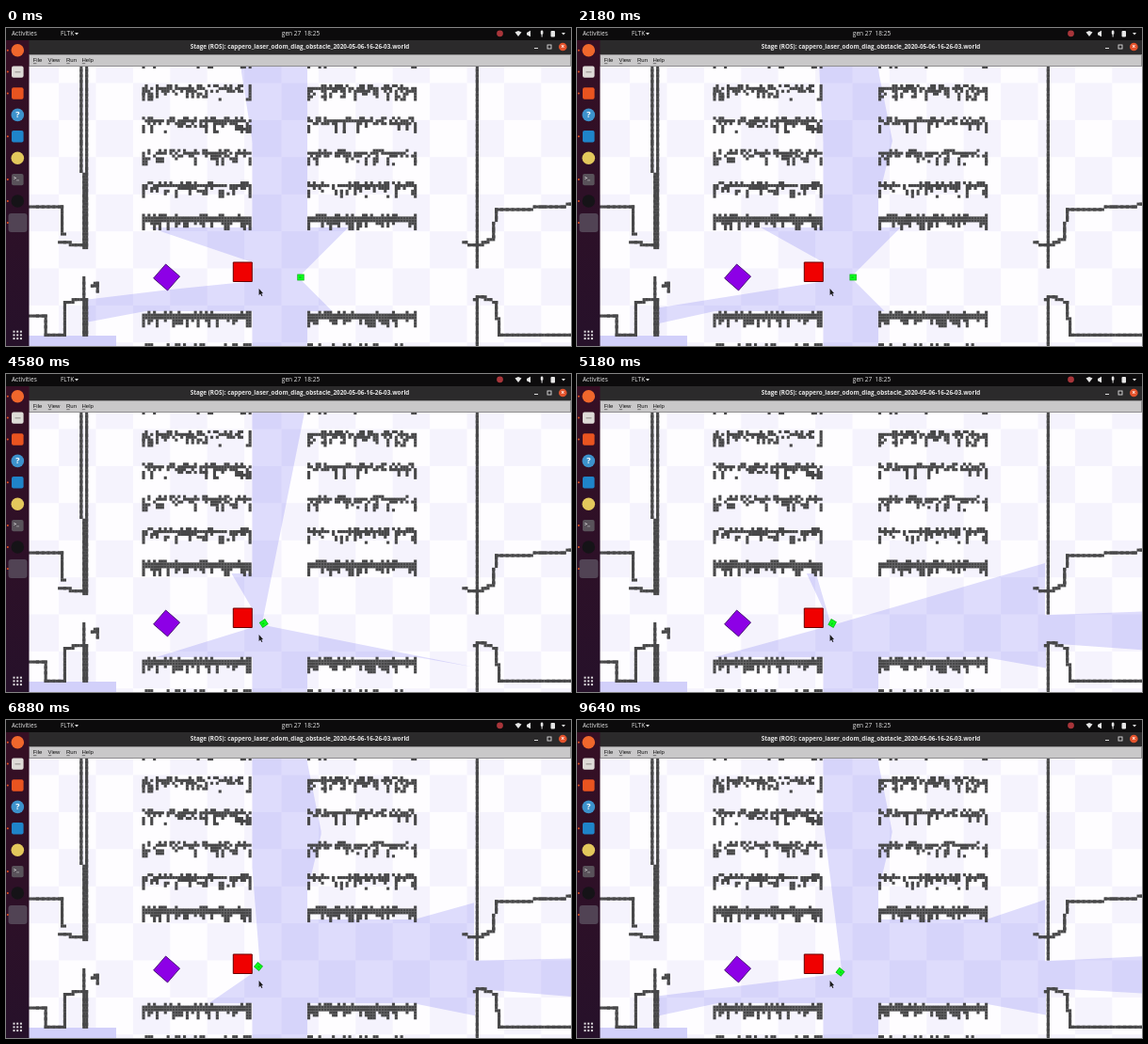
Animation, 600 px wide and 338 px high, one loop 9.73 s. Source, as an HTML page with a canvas:

```html
<!DOCTYPE html>
<html lang="en">
<head>
<meta charset="utf-8">
<title>Robot simulation</title>
<style>
  html, body { margin: 0; width: 100%; height: 100%; overflow: hidden; background: #fff; }
  canvas { display: block; width: 600px; height: 338px; }
</style>
</head>
<body>
<canvas id="stage" width="600" height="338"></canvas>
<script>
const LOOP = 9730, W = 600, H = 338, CELL = 2.9, DARK = '#484849', FAR = 300;
const LEFT_SHELF = 144.5, RIGHT_SHELF = 320, SHELF_W = 117;
const ctx = document.getElementById('stage').getContext('2d');

let seed = 41;
function random() {
  seed = (seed * 16807) % 2147483647;
  return seed / 2147483647;
}
const chance = p => random() < p;

function makeLayer(draw) {
  const layer = document.createElement('canvas');
  layer.width = W;
  layer.height = H;
  draw(layer.getContext('2d'));
  return layer;
}

function rect(g, color, x, y, w, h) {
  g.fillStyle = color;
  g.fillRect(x, y, w, h);
}

function rounded(g, color, x, y, w, h, r) {
  g.fillStyle = color;
  g.beginPath();
  g.roundRect(x, y, w, h, r);
  g.fill();
}

const disc = (g, color, x, y, r) => rounded(g, color, x - r, y - r, 2 * r, 2 * r, r);

function poly(g, points, fill, stroke) {
  g.beginPath();
  points.forEach(([x, y]) => g.lineTo(x, y));
  g.closePath();
  if (fill) { g.fillStyle = fill; g.fill(); }
  if (stroke) { g.strokeStyle = stroke; g.lineWidth = 1; g.stroke(); }
}

function text(g, value, x, y, font, color, align = 'left') {
  g.font = font;
  g.fillStyle = color;
  g.textAlign = align;
  g.textBaseline = 'middle';
  g.fillText(value, x, y);
}

const box = (x, y, w, h) => [[x, y], [x + w, y], [x + w, y + h], [x, y + h]];

function turnedSquare(x, y, radius, turn) {
  return [0, 1, 2, 3].map(i => {
    const a = turn + i * Math.PI / 2;
    return [x + radius * Math.cos(a), y + radius * Math.sin(a)];
  });
}

const RED = box(241.3, 249, 20, 20.5);
const PURPLE = turnedSquare(170.6, 265, 14, -0.07);

// Ragged shelf of map cells: an uneven band with drips below it.
function shelf(g, x, y, solid) {
  const columns = Math.round(SHELF_W / CELL);
  for (let i = 0; i < columns; i++) {
    const put = row => rect(g, DARK, x + i * CELL, y + row * CELL, CELL + 0.2, CELL + 0.2);
    const edge = i === 0 || i === columns - 1;
    if (chance(0.35)) put(0);
    if (solid || chance(0.85)) put(1);
    if (solid || chance(0.5)) put(2);
    const drop = edge ? 3 : chance(solid ? 0.45 : 0.3) ? 1 + Math.floor(random() * 3) : 0;
    for (let k = 0; k < drop; k++) put(3 + k);
    if (!solid && chance(0.12)) put(3 + Math.floor(random() * 3));
  }
}

// Walls are polylines snapped to the cells of the map.
function wall(g, ...points) {
  const snap = v => Math.round(v / CELL) * CELL;
  for (let i = 1; i < points.length; i++) {
    const [ax, ay] = points[i - 1], [bx, by] = points[i];
    const steps = Math.ceil(Math.hypot(bx - ax, by - ay) / 2);
    for (let k = 0; k <= steps; k++) {
      const t = k / steps;
      rect(g, DARK, snap(ax + (bx - ax) * t - 1.5), snap(ay + (by - ay) * t - 1.5),
        CELL + 0.2, CELL + 0.2);
    }
  }
}

const floor = makeLayer(g => {
  rect(g, '#fefdff', 0, 0, W, H);
  const size = 39.4;
  for (let row = -1; row < 8; row++)
    for (let col = -7; col < 8; col++)
      if ((row + col) % 2 === 0)
        rect(g, '#f5f3fd', 292.5 + col * size, 58.5 + row * size, size, size);
});

const map = makeLayer(g => {
  rect(g, '#d2d0fa', 24, 327, 93, 11);
  for (let i = 0; i < 10; i++) {
    if (i === 6 || i === 7) continue;
    for (const x of [LEFT_SHELF, RIGHT_SHELF]) shelf(g, x, 25.5 + i * 34.4, i > 4);
  }

  wall(g, [85, 42], [85, 234]);
  wall(g, [80.5, 42], [80.5, 120], [83, 234]);
  wall(g, [26, 189], [60, 189], [61, 220]);
  wall(g, [58, 227], [83, 232]);
  wall(g, [82, 266], [82, 326]);
  wall(g, [85, 288], [85, 326]);
  wall(g, [91, 275], [96, 271], [96, 281]);
  wall(g, [26, 307], [42, 307], [42, 325], [61, 325], [63, 292], [79, 288]);

  wall(g, [499, 42], [499, 255]);
  wall(g, [486, 228], [500, 232], [518, 223], [520, 193], [570, 191], [600, 188]);
  wall(g, [499, 286], [499, 338]);
  wall(g, [496, 289], [505, 285], [521, 292], [523, 325], [600, 326]);

  poly(g, PURPLE, '#8d00e6', '#4a1478');
  poly(g, RED, '#f00000', '#6a0000');
});

function drawDock(g) {
  const shade = g.createLinearGradient(0, 13, 0, H);
  shade.addColorStop(0, '#360f24');
  shade.addColorStop(1, '#26112a');
  rect(g, shade, 0, 13, 24.5, 325);

  const icons = [['disc', '#f0672c'], ['tile', '#dedbd7'], ['tile', '#e95420'],
    ['disc', '#3d92cc'], ['tile', '#1f84c9'], ['disc', '#e3c85c'],
    ['tile', '#59525a'], ['disc', '#151317'], ['slot', '#514354']];
  icons.forEach(([kind, color], i) => {
    const y = 23.7 + i * 22.9;
    if (kind === 'disc') disc(g, color, 12.3, y, 6.8);
    else if (kind === 'tile') rounded(g, color, 6, y - 6.2, 12.6, 12.4, 2);
    else rounded(g, color, 2.5, y - 10, 20, 20, 3);
    if (i !== 3 && i !== 5) disc(g, '#e95420', 1.8, y, 1);
  });
  rect(g, '#a9a5a2', 9.5, 46, 6, 1.5);
  text(g, '?', 12.3, 92.8, 'bold 9px "Open Sans", sans-serif', '#fff', 'center');
  text(g, '>_', 8, 160, 'bold 5px "DejaVu Sans Mono", monospace', '#eee');

  for (let i = 0; i < 9; i++)
    rect(g, '#e2dfe2', 7.5 + (i % 3) * 3.7, 321.7 + Math.floor(i / 3) * 3.7, 2, 2);
}

function drawTopBar(g) {
  const ink = '#e6e6e6', font = '6.5px "Open Sans", sans-serif';
  const caret = x => poly(g, [[x - 2, 5], [x + 2, 5], [x, 7.5]], ink);
  rect(g, '#0c0b0c', 0, 0, W, 13);
  text(g, 'Activities', 6, 6.3, font, ink);
  text(g, 'FLTK', 58, 6.3, font, ink);
  text(g, 'gen 27  18:25', 313, 6.3, font, ink, 'center');
  caret(75);
  caret(592);

  disc(g, '#a8353a', 524.5, 5.8, 3.4);
  poly(g, [[540.5, 4.5], [544, 3], [547.5, 4.5], [544, 9]], ink);
  poly(g, [[553, 5], [557, 2.8], [557, 9.2], [553, 7.3]], ink);
  rounded(g, ink, 567.8, 2.5, 2.6, 4.5, 1.3);
  rect(g, ink, 568.6, 7, 1, 2.5);
  rounded(g, ink, 578.5, 3, 4.5, 6.5, 1);
}

function drawWindowBars(g) {
  rect(g, '#2b2a2b', 24, 13, 576, 15);
  text(g, 'Stage (ROS): cappero_laser_odom_diag_obstacle_2020-05-06-16-26-03.world',
    312, 20.2, 'bold 6.35px "Open Sans", sans-serif', '#e6e6e6', 'center');
  rect(g, '#ddd', 561, 21, 4, 1);
  g.strokeStyle = '#ddd';
  g.lineWidth = 0.9;
  g.strokeRect(575, 18, 4, 4);
  disc(g, '#e4532c', 591.3, 20, 4.3);
  text(g, '×', 591.3, 20, 'bold 7px "Open Sans", sans-serif', '#fff', 'center');

  rect(g, '#8f8e8f', 24, 28, 576, 13);
  rect(g, '#c9c8c9', 25, 29, 574, 11);
  [['File', 28.7], ['View', 44.5], ['Run', 64], ['Help', 80.5]].forEach(([label, x]) => {
    text(g, label, x, 34.8, '6px "Liberation Sans", sans-serif', '#101010');
    rect(g, '#333', x + 0.3, 37.5, 3.4, 0.6);
  });
}

const chrome = makeLayer(g => {
  drawTopBar(g);
  drawWindowBars(g);
  drawDock(g);
  poly(g, [[268.6, 277], [268.6, 284], [270.2, 282.6], [271.4, 285], [272.4, 284.4],
    [271.3, 282.3], [273, 282]], '#1a1a1a');
});

const segments = points => points.slice(1).map((p, i) => [points[i], p]);
const outlineOf = points => segments([...points, points[0]]);

const OBSTACLES = [
  RED, PURPLE,
  box(LEFT_SHELF, 301, SHELF_W, FAR), box(RIGHT_SHELF, 301, SHELF_W, FAR),
  box(0, -FAR, 87, FAR + 235), box(0, 264, 87, FAR),
  box(497, -FAR, 3, FAR + 257), box(498, 286, 24, FAR)
].flatMap(outlineOf);

// The upper shelves let the scan reach a little between their ends.
function upperShelf(outer, inner, middle, top) {
  return segments([[outer, -FAR], [outer, 212], [inner, 212], [inner, 182],
    [inner + middle, 120], [inner + top, 45], [inner + top, -FAR]]);
}

function castRay(x, y, angle, obstacles) {
  const dx = Math.cos(angle), dy = -Math.sin(angle);
  let best = 700;
  for (const [[ax, ay], [bx, by]] of obstacles) {
    const sx = bx - ax, sy = by - ay, cross = dx * sy - dy * sx;
    if (Math.abs(cross) < 1e-9) continue;
    const t = ((ax - x) * sy - (ay - y) * sx) / cross;
    const u = ((ax - x) * dy - (ay - y) * dx) / cross;
    if (t > 0 && t < best && u >= 0 && u <= 1) best = t;
  }
  return [x + dx * best, y + dy * best];
}

function drawScan({ x, y, heading }) {
  const rad = Math.PI / 180, reach = 2.5;
  const sx = x + reach * Math.cos(heading * rad), sy = y - reach * Math.sin(heading * rad);
  const left = -Math.max(0, x - 282) * 0.38;
  const right = Math.min(15, Math.max(0, 313 - x) * 0.8);
  const obstacles = OBSTACLES.concat(
    upperShelf(LEFT_SHELF, LEFT_SHELF + SHELF_W, 0, left),
    upperShelf(RIGHT_SHELF + SHELF_W, RIGHT_SHELF, right, 0));
  const outline = [[sx, sy]];
  for (let a = -135; a <= 135; a += 0.5)
    outline.push(castRay(sx, sy, (heading + a) * rad, obstacles));
  poly(ctx, outline, 'rgba(18, 8, 230, 0.135)');
}

function drawRobot({ x, y, heading }) {
  ctx.save();
  ctx.translate(x, y);
  ctx.rotate(-heading * Math.PI / 180);
  rect(ctx, '#08b414', -3.7, -3.4, 7.4, 6.8);
  rect(ctx, '#0cff1c', -3, -2.7, 6, 5.4);
  rect(ctx, '#0cc81a', -0.6, -0.8, 2.4, 1.6);
  ctx.restore();
}

const ramp = (t, from, to) => Math.min(1, Math.max(0, (t - from) / (to - from)));
const easeOut = t => t * (2 - t);

// Drive left, slow down while turning at the red box, then pull away.
function poseAt(t) {
  const leave = ramp(t, 8240, 9640);
  return {
    x: 313 - 35 * ramp(t, 0, 3850) - 10 * easeOut(ramp(t, 3850, 6880))
      + 2 * ramp(t, 7500, 8240) + 9.5 * leave,
    y: 265 - 3 * ramp(t, 5180, 6880) + 0.5 * ramp(t, 7500, 8240) + 5.3 * leave,
    heading: 180 + 168 * ramp(t, 3850, 7500) - 26 * ramp(t, 8240, 9000)
  };
}

function render() {
  const pose = poseAt(performance.now() % LOOP);
  ctx.drawImage(floor, 0, 0);
  drawScan(pose);
  ctx.drawImage(map, 0, 0);
  drawRobot(pose);
  ctx.drawImage(chrome, 0, 0);
  requestAnimationFrame(render);
}
render();
</script>
</body>
</html>
```
